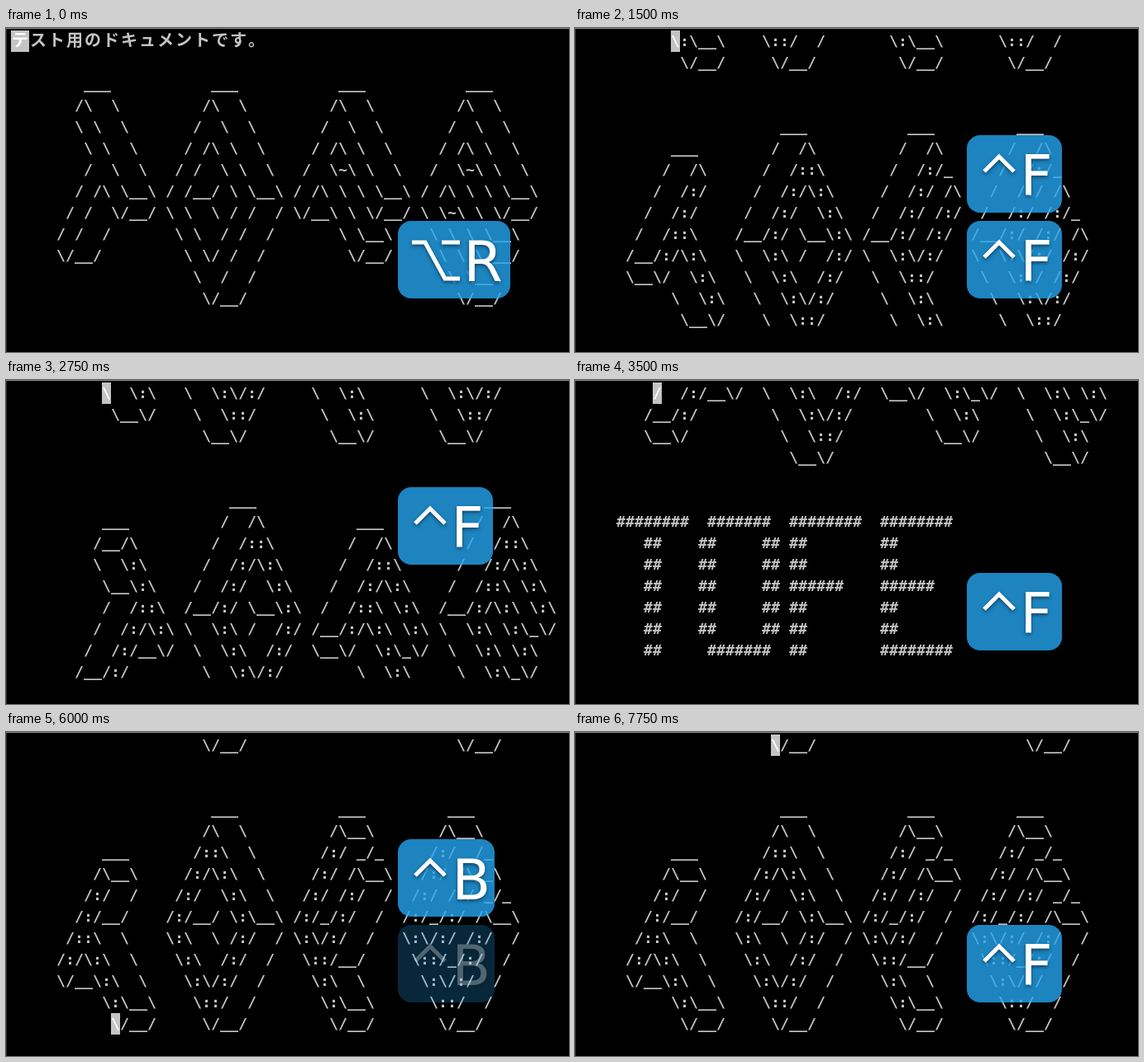
Animation of 681x393 px, one loop 8000 ms. Source, as an HTML page with a canvas:

```html
<!DOCTYPE html>
<html lang="ja">
<head>
<meta charset="utf-8">
<title>Terminal paging</title>
<style>
html, body { margin: 0; height: 100%; overflow: hidden; background: #000; }
canvas { display: block; }
</style>
</head>
<body>
<canvas id="stage" width="681" height="393"></canvas>
<script>
const lines = String.raw`テスト用のドキュメントです。

        ___           ___           ___           ___
       /\  \         /\  \         /\  \         /\  \
       \ \  \       /  \  \       /  \  \       /  \  \
        \ \  \     / /\ \  \     / /\ \  \     / /\ \  \
        /  \  \   / /  \ \  \   /  \~\ \  \   /  \~\ \  \
       / /\ \__\ / /__/ \ \__\ / /\ \ \ \__\ / /\ \ \ \__\
      / /  \/__/ \ \  \ / /  / \/__\ \ \/__/ \ \~\ \ \/__/
     / /  /       \ \  / /  /       \ \__\    \ \ \ \__\
     \/__/         \ \/ /  /         \/__/     \ \ \/__/
                    \  /  /                     \ \__\
                     \/__/                       \/__/


                      ___           ___         ___
                     /\  \         /\__\       /\__\
          ___       /::\  \       /:/ _/_     /:/ _/_
         /\__\     /:/\:\  \     /:/ /\__\   /:/ /\__\
        /:/  /    /:/  \:\  \   /:/ /:/  /  /:/ /:/ _/_
       /:/__/    /:/__/ \:\__\ /:/_/:/  /  /:/_/:/ /\__\
      /::\  \    \:\  \ /:/  / \:\/:/  /   \:\/:/ /:/  /
     /:/\:\  \    \:\  /:/  /   \::/__/     \::/_/:/  /
     \/__\:\  \    \:\/:/  /     \:\  \      \:\/:/  /
          \:\__\    \::/  /       \:\__\      \::/  /
           \/__/     \/__/         \/__/       \/__/


                      ___           ___         ___
          ___        /  /\         /  /\       /  /\
         /  /\      /  /::\       /  /:/_     /  /:/_
        /  /:/     /  /:/\:\     /  /:/ /\   /  /:/ /\
       /  /:/     /  /:/  \:\   /  /:/ /:/  /  /:/ /:/_
      /  /::\    /__/:/ \__\:\ /__/:/ /:/  /__/:/ /:/ /\
     /__/:/\:\   \  \:\ /  /:/ \  \:\/:/   \  \:\/:/ /:/
     \__\/  \:\   \  \:\  /:/   \  \::/     \  \::/ /:/
          \  \:\   \  \:\/:/     \  \:\      \  \:\/:/
           \__\/    \  \::/       \  \:\      \  \::/
                     \__\/         \__\/       \__\/


                        ___                         ___
          ___          /  /\          ___          /  /\
         /__/\        /  /::\        /  /\        /  /::\
         \  \:\      /  /:/\:\      /  /::\      /  /:/\:\
          \__\:\    /  /:/  \:\    /  /:/\:\    /  /::\ \:\
          /  /::\  /__/:/ \__\:\  /  /::\ \:\  /__/:/\:\ \:\
         /  /:/\:\ \  \:\ /  /:/ /__/:/\:\ \:\ \  \:\ \:\_\/
        /  /:/__\/  \  \:\  /:/  \__\/  \:\_\/  \  \:\ \:\
       /__/:/        \  \:\/:/        \  \:\     \  \:\_\/
       \__\/          \  \::/          \__\/      \  \:\
                       \__\/                       \__\/


    ########  #######  ########  ########
       ##    ##     ## ##        ##
       ##    ##     ## ##        ##
       ##    ##     ## ######    ######
       ##    ##     ## ##        ##
       ##    ##     ## ##        ##
       ##     #######  ##        ########`.split('\n');

const LOOP = 8000, TICK = 250;
const LEFT = 6, TOP = 3, CELL = 11, ROW = 26, ROWS = 14;

// Key presses: time, key, badge slot (0 = lower), first visible line, cursor row
const presses = [
  [-250, 'R', 0, 0, 0],
  [750, 'F', 1, 12, 0],
  [1500, 'F', 0, 24, 0],
  [2250, 'F', 1, 36, 0],
  [3250, 'F', 0, 48, 0],
  [4250, 'B', 1, 36, ROWS - 1],
  [5000, 'B', 0, 24, ROWS - 1],
  [5750, 'B', 1, 12, ROWS - 1],
  [6250, 'B', 0, 0, ROWS - 1],
  [7750, 'F', 0, 12, 0],
];

// Badge width and letter position per key
const badges = { R: [136, 79.5], F: [115, 64.5], B: [117, 65.5] };
const optionSign = new Path2D('M17 26H33L57 70H75M53 26H75');
const controlSign = new Path2D('M21 44L39 26L57 44');

const ctx = document.getElementById('stage').getContext('2d');

const isWide = ch => ch > '\u00ff';

function drawChar(ch, x, y) {
  ctx.font = isWide(ch)
    ? 'bold 20px "Noto Sans CJK JP", "Noto Sans CJK", sans-serif'
    : 'bold 18.27px "DejaVu Sans Mono", monospace';
  ctx.fillText(ch, x + (isWide(ch) ? 1 : 0), y + 19);
}

function drawLine(text, y) {
  let x = LEFT;
  for (const ch of text) {
    drawChar(ch, x, y);
    x += isWide(ch) ? 2 * CELL : CELL;
  }
}

function drawCursor(text, y) {
  const col = Math.max(0, text.search(/\S/));
  const ch = text[col] || ' ';
  const x = LEFT + col * CELL;
  ctx.fillStyle = '#c4c4c4';
  ctx.fillRect(x, y, isWide(ch) ? 2 * CELL : CELL, ROW);
  ctx.fillStyle = '#fff';
  drawChar(ch, x, y);
}

function drawBadge(key, slot, alpha) {
  const [width, letterX] = badges[key];
  ctx.save();
  ctx.globalAlpha = alpha;
  ctx.translate(474, 234 - slot * 104);
  ctx.fillStyle = 'rgba(37, 166, 240, .8)';
  ctx.beginPath();
  ctx.roundRect(0, 0, width, 94, 16);
  ctx.fill();
  ctx.shadowColor = 'rgba(0, 0, 0, .5)';
  ctx.shadowBlur = 4;
  ctx.shadowOffsetY = 2;
  ctx.fillStyle = ctx.strokeStyle = '#fff';
  ctx.lineWidth = 5;
  ctx.stroke(key === 'R' ? optionSign : controlSign);
  ctx.font = '68px "DejaVu Sans", sans-serif';
  ctx.fillText(key, letterX, 73);
  ctx.restore();
}

function draw(now) {
  const time = Math.floor(now % LOOP / TICK) * TICK;
  const past = presses.filter(([start]) => start <= time);
  const [, , , first, cursorRow] = past[past.length - 1];

  ctx.fillStyle = '#000';
  ctx.fillRect(0, 0, 681, 393);
  ctx.fillStyle = '#8c8c8c';
  ctx.fillRect(0, 0, 681, 1);
  ctx.fillStyle = '#303030';
  ctx.fillRect(0, 1, 1, 392);

  ctx.fillStyle = '#c4c4c4';
  for (let row = 0; row < ROWS; row++) {
    drawLine(lines[first + row] || '', TOP + row * ROW);
  }
  drawCursor(lines[first + cursorRow] || '', TOP + cursorRow * ROW);

  for (const [start, key, slot] of past) {
    const age = time - start;
    if (age <= 1000) drawBadge(key, slot, age < 1000 ? 1 : 0.3);
  }
  requestAnimationFrame(draw);
}
requestAnimationFrame(draw);
</script>
</body>
</html>
```
